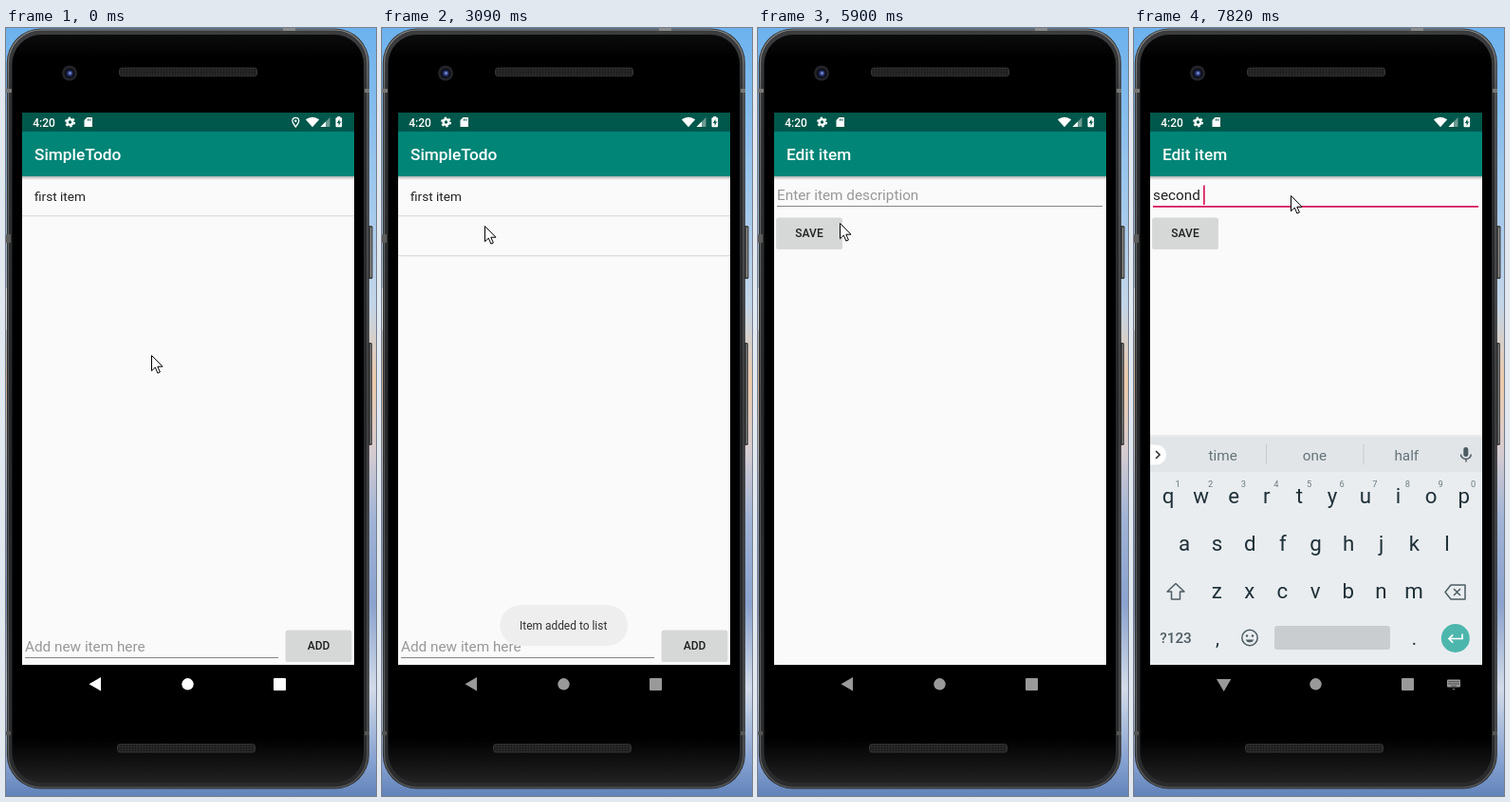
Animation, 390 px wide and 808 px high, one loop 8000 ms. Source, as an HTML page:

```html
<!DOCTYPE html>
<html lang="en">
<head>
<meta charset="utf-8">
<title>To-do app on a phone</title>
<style>
  html, body { margin: 0; width: 100%; height: 100%; overflow: hidden; background: #000; }
  svg { display: block; width: 390px; height: 808px; }
  text { font-family: Roboto, sans-serif; white-space: pre; }
  .mid { text-anchor: middle; }
  .line { fill: none; stroke: #4d5c63; stroke-width: 1.5; stroke-linejoin: round; }
</style>
</head>
<body>
<svg id="stage" viewBox="0 0 390 808"></svg>
<script>
const stage = document.getElementById('stage');

const rect = (x, y, w, h, fill, r = 0, more = '') =>
  `<rect x="${x}" y="${y}" width="${w}" height="${h}" rx="${r}" fill="${fill}" ${more}/>`;
const text = (x, y, size, fill, str, more = '') =>
  `<text x="${x}" y="${y}" font-size="${size}" fill="${fill}" ${more}>${str}</text>`;
const circle = (x, y, r, fill, more = '') =>
  `<circle cx="${x}" cy="${y}" r="${r}" fill="${fill}" ${more}/>`;
const path = (d, fill, more = '') => `<path d="${d}" fill="${fill}" ${more}/>`;
const group = (id, body) => `<g id="${id}">${body}</g>`;
const mid = 'class="mid"', bold = 'class="mid" font-weight="500"', line = 'class="line"';

const gradient = (id, stops) => `<linearGradient id="${id}" x2="0" y2="1">` +
  stops.map(([at, color, alpha = 1]) =>
    `<stop offset="${at}" stop-color="${color}" stop-opacity="${alpha}"/>`).join('') +
  '</linearGradient>';

const defs = '<defs>' +
  gradient('sky', [[0, '#6cb2ee'], [.2, '#9cc6ec'], [.36, '#c3d5e8'], [.46, '#ecc9a8'], [.55, '#d6ccd0'],
    [.64, '#a0b3d6'], [.75, '#8ba3ce'], [.86, '#d3dbe9'], [.95, '#8aa5d2'], [1, '#6283ba']]) +
  gradient('rim', [[0, '#3c3d3e'], [.1, '#2e2f30'], [.5, '#262728'], [1, '#2b2c2d']]) +
  gradient('glint', [[0, '#8c8d8e'], [.08, '#6a6b6c'], [.5, '#4c4d4e'], [1, '#5c5d5e']]) +
  gradient('face', [[0, '#0c0c0c'], [.03, '#000'], [.94, '#000'], [.985, '#191919'], [1, '#222']]) +
  gradient('shade', [[0, '#000', .3], [1, '#000', 0]]) +
  `<pattern id="mesh" width="3" height="3" patternUnits="userSpaceOnUse">
     ${rect(0, 0, 3, 3, '#292929')}${circle(1.5, 1.5, .9, '#161616')}</pattern>
   <clipPath id="screen">${rect(17, 89, 350, 581, '#000')}</clipPath></defs>`;

function phone() {
  const speaker = (x, y) => rect(x, y, 145, 8.5, 'url(#mesh)', 2.5, 'stroke="#3b3b3b" stroke-width=".8"');
  return rect(0, 0, 390, 808, 'url(#sky)') + rect(0, 274, 3, 44, '#fff') +
    rect(381, 208, 5.5, 56, '#444', 1.5) + rect(381, 331, 5, 108, '#444', 1.5) +
    rect(384, 210, 1.2, 52, '#8a8a8a') + rect(384, 333, 1, 104, '#7a7a7a') +
    rect(.8, .5, 382, 800, 'url(#rim)', 36) +
    rect(2.5, 2, 378.5, 797, 'none', 34.5, 'stroke="url(#glint)" stroke-width="1.2"') +
    rect(6.5, 7, 370.5, 787, 'url(#face)', 31) +
    rect(292, 0, 13, 3, '#8b8b8b') + rect(0, 64, 6, 4, '#777') + rect(378, 64, 5, 4, '#777') +
    rect(0, 217, 5, 9, '#5c5c5c') + rect(0, 740, 5, 4, '#555') + rect(378, 740, 5, 4, '#555') +
    speaker(119.5, 42) + speaker(117.5, 753.5) +
    circle(67, 47.5, 8, '#24252b') + circle(67, 47.5, 5.5, '#10111c') +
    circle(67.3, 47.7, 3, '#2d3c80') + circle(67.5, 47.5, 1.3, '#8492d6');
}

const page = (title, body) =>
  rect(17, 150, 350, 520, '#fafafa') + rect(17, 156, 350, 4, 'url(#shade)') +
  rect(17, 89, 350, 20, '#00574b') + rect(17, 109, 350, 47, '#008577') +
  text(30, 139, 17.25, '#fff', title, 'font-weight="500"') + body;

const button = (x, y, label) =>
  rect(x - .5, y + .5, 70, 33, '#000', 2, 'opacity=".13"') + rect(x, y, 69, 32, '#d6d7d7', 2) +
  text(x + 34.5, y + 20.3, 12, '#212121', label, bold);

const listPage = page('SimpleTodo',
  text(30, 182, 13.6, '#212121', 'first item') + rect(17, 197, 350, 1.3, '#dcdcdc') +
  rect(17, 239, 350, 1.3, '#dcdcdc', 0, 'id="row"') +
  text(20, 656.3, 15.3, '#989898', 'Add new item here') +
  rect(20, 662, 267, 1, '#858585') + button(295, 633.5, 'ADD'));

const editPage = page('Edit item',
  text(20, 181.3, 15.3, '#989898', 'Enter item description', 'id="hint"') +
  text(20, 181.3, 15.3, '#212121', '', 'id="typed"') +
  rect(20, 183, 0, 1, '#333', 0, 'id="compose"') +
  rect(20, 187, 343, 1, '#858585', 0, 'id="rule"') +
  rect(20, 165.5, 1.7, 20.5, '#d81b60', 0, 'id="caret"') + button(19.5, 199.5, 'SAVE'));

function keyboard() {
  const ink = '#1f3038', soft = '#4d5c63';
  const keys = (letters, x, y) => [...letters].map((c, i) =>
    text(x + i * 34.63, y, 22.3, ink, c, mid)).join('');
  const digits = [...'1234567890'].map((c, i) => text(46 + i * 34.63, 482.5, 9.3, '#6d7a80', c, mid)).join('');
  const words = ['time', 'one', 'half'].map((w, i) => text(93.7 + i * 96.8, 454.5, 15.3, '#65747a', w, mid)).join('');
  return rect(17, 430, 350, 240, '#e9edf0') + rect(17, 430, 350, 37, '#e1e5e8') +
    rect(17, 428, 350, 2, '#000', 0, 'opacity=".06"') +
    rect(6, 438.5, 28, 21, '#fff', 10.5) + path('M23 445l4 4-4 4', 'none', 'stroke="#333" stroke-width="1.6"') +
    group('ask', text(190.5, 454, 13.6, '#4db6ac', 'Suggest contacts? Tap for info.', mid)) +
    group('words', words + rect(139, 438, 1, 21, '#c5cbce') + rect(241.5, 438, 1, 21, '#c5cbce')) +
    rect(347.3, 441, 5, 10, soft, 2.5) + path('M344.5 448.5a5.4 5 0 0 0 10.8 0M350 453.5v3', 'none', line) +
    keys('qwertyuiop', 36, 499.5) + digits + keys('asdfghjkl', 53, 549.5) + keys('zxcvbnm', 87.2, 600) +
    path('M44 584.5l9 8.5h-4.5v8h-9v-8H35z', 'none', line) +
    path('M334 586h15v15h-15l-6-7.5zM337 590l7 7m0-7l-7 7', 'none', line) +
    text(44, 647.3, 15.3, soft, '?123', bold) + text(88, 649, 20, ink, ',', mid) + text(295.5, 649, 20, ink, '.', mid) +
    circle(122, 641.5, 8.2, 'none', line) + circle(119, 639.5, 1.2, soft) + circle(125, 639.5, 1.2, soft) +
    path('M117.5 643.5a5 5 0 0 0 9 0z', soft) +
    rect(148, 629, 122, 25, '#c9cdd0', 3) + circle(338.8, 642, 15, '#4db6ac') +
    path('M346 637.5v5h-14m4.2-4.2l-4.2 4.2 4.2 4.2', 'none', 'stroke="#fff" stroke-width="1.7"');
}

const statusBar = text(28.3, 103.5, 12, '#fff', '4:20', 'font-weight="500"') +
  circle(67.5, 99, 2.9, 'none', 'stroke="#fff" stroke-width="2.4"') +
  circle(67.5, 99, 4.7, 'none', 'stroke="#fff" stroke-width="1.6" stroke-dasharray="2.4 2.52"') +
  path('M85.5 94h5.5v10h-8.5v-7z', '#fff') + rect(85.6, 95.6, .9, 2, '#00574b') +
  rect(87.2, 95.6, .9, 2, '#00574b') + rect(88.8, 95.6, .9, 2, '#00574b') +
  group('place', path('M305.3 104c-2-2.6-3.4-4.5-3.4-6.2a3.4 3.4 0 0 1 6.8 0c0 1.7-1.4 3.6-3.4 6.2z', 'none',
    'stroke="#fff" stroke-width="1.3"') + circle(305.3, 97.8, 1.2, '#fff')) +
  path('M315.8 96.3q7.2-5 14.4 0l-7.2 8z', '#fff') +
  path('M331.5 104l10-10v10z', '#6c9a93') + path('M331.5 104l5.5-5.5v5.5z', '#fff') +
  rect(347.5, 94.3, 6.6, 10, '#fff', 1) + rect(349.3, 93, 3, 2, '#fff') +
  path('M351.5 95.7l-2.6 4.2h1.7v3l2.6-4.3h-1.7z', '#00574b');

const navBar = path('M87.5 690.3l12.5-7.3v14.6z', '#fff', 'id="back"') +
  path('M87 685h15.3l-7.6 13z', '#fff', 'id="down"') + circle(191.5, 690.3, 6.2, '#fff') +
  rect(282, 684, 13, 13, '#fff', 1) +
  group('switch', rect(330, 685.5, 14, 8, '#fff', 1) +
    path('M331.5 687.7h11M331.5 690h11', 'none', 'stroke="#000" stroke-dasharray="1 1"') +
    path('M334 692.2h6M335 695l2 1.5 2-1.5', '#fff', 'stroke="#000" stroke-width=".5"'));

const toast = rect(124.5, 607, 134.5, 43, '#eeeeee', 21.5) +
  text(145, 633.2, 11.95, '#303030', 'Item added to list');

stage.innerHTML = defs + phone() + group('list', listPage) + group('edit', editPage) +
  `<g clip-path="url(#screen)">${group('keys', keyboard())}</g>` +
  group('status', statusBar) + group('nav', navBar) + group('toast', toast) +
  group('pointer', path('M.5 .5v16.2l3.8-3.6 2.6 6 2.5-1.1-2.6-5.8h5.2z', '#fff', 'stroke="#000" stroke-width="1"'));

// Pointer stops: time, x, y
const stops = [
  [150, 153, 344], [1040, 243, 655], [1100, 243, 655], [1500, 328, 659], [1800, 328, 649],
  [2300, 328, 649], [3050, 108, 208], [3500, 108, 208], [4150, 146, 633], [4360, 146, 633],
  [5060, 84, 206], [5860, 84, 206], [6320, 165, 176]
];
const keyTimes = [6880, 7030, 7150, 7420, 7550, 7680, 7820];
const word = 'second ';

const get = id => document.getElementById(id);
const show = (id, on) => get(id).style.display = on ? '' : 'none';
const fade = (id, a) => get(id).style.opacity = a;
const move = (id, x, y) => get(id).setAttribute('transform', `translate(${x} ${y})`);
const ramp = (t, a, b) => Math.min(1, Math.max(0, (t - a) / (b - a)));
const ease = p => p * p * (3 - 2 * p);

function pointerAt(t) {
  let [, x, y] = stops[0];
  for (let i = 1; i < stops.length; i++) {
    const p = ease(ramp(t, stops[i - 1][0], stops[i][0]));
    x += (stops[i][1] - stops[i - 1][1]) * p;
    y += (stops[i][2] - stops[i - 1][2]) * p;
  }
  return [Math.round(x), Math.round(y)];
}

function draw(t) {
  move('pointer', ...pointerAt(t));
  show('place', t < 670);
  fade('nav', 1 - .4 * ramp(t, 150, 800));
  show('row', t >= 2150);
  fade('toast', ramp(t, 2200, 2560) * (1 - ramp(t, 4420, 4760)));

  // The edit screen settles upwards in whole pixels
  show('edit', t >= 4070);
  move('edit', 0, Math.floor(15 * Math.exp(Math.min(0, 4070 - t) / 61)));

  const focus = t >= 6380;
  const count = keyTimes.filter(k => t >= k).length;
  const typed = get('typed');
  typed.textContent = word.slice(0, count);
  const width = count ? typed.getComputedTextLength() : 0;
  show('hint', !count);
  show('caret', focus);
  get('caret').setAttribute('x', 20 + width - (count ? .6 : 0));
  get('compose').setAttribute('width', count < word.length ? width : 0);
  get('rule').setAttribute('fill', focus ? '#d81b60' : '#858585');
  get('rule').setAttribute('height', focus ? 1.8 : 1);

  const rise = ramp(t, 6450, 6760);
  show('keys', rise > 0);
  move('keys', 0, 240 * (1 - rise) ** 3);
  show('back', !rise);
  show('down', rise);
  show('switch', rise);
  show('ask', count < word.length);
  show('words', count === word.length);
}

const start = performance.now();
function tick() {
  draw((performance.now() - start) % 8000);
  requestAnimationFrame(tick);
}
tick();
</script>
</body>
</html>
```
